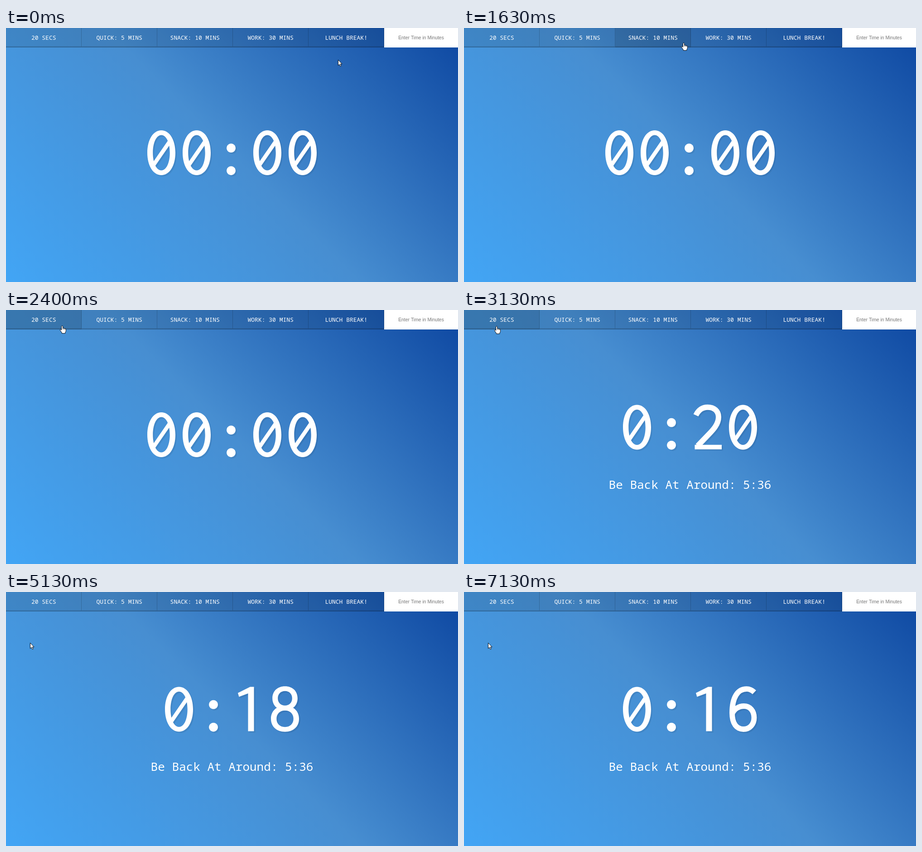
Recreate the animation shown at these times as an HTML page with a canvas. Size 998 by 561 pixels, loop 8000 ms.

```html
<!DOCTYPE html>
<html lang="en">
<head>
<meta charset="utf-8">
<title>Countdown Timer</title>
<style>
  html, body { margin: 0; width: 100%; height: 100%; overflow: hidden; background: #478ed1; }
  canvas { display: block; }
</style>
</head>
<body>
<canvas id="stage" width="998" height="561" role="img"></canvas>
<script>
const W = 998, H = 561, LOOP = 8000;
const BTN = 167, BAR = 43;
const MONO = '"Noto Sans Mono", "DejaVu Sans Mono", monospace';
const LABELS = ['20 SECS', 'QUICK: 5 MINS', 'SNACK: 10 MINS', 'WORK: 30 MINS', 'LUNCH BREAK!'];

const stage = document.getElementById('stage');
const ctx = stage.getContext('2d');
const layer = document.createElement('canvas');
layer.width = W;
layer.height = H;
const ink = layer.getContext('2d');

// Pointer stops: time, x, y, eased arrival
const STOPS = [
  [0, 733, 70], [500, 733, 70], [830, 733, 31, 1], [1130, 733, 30],
  [1630, 485, 33], [1930, 345, 33], [1970, 330, 33], [2030, 318, 33],
  [2500, 72, 36], [3240, 72, 36], [3830, 53, 112, 1], [LOOP, 53, 112]
];

// Countdown readings: start time, text
const READINGS = [[0, '00:00'], [3130, '0:20'], [4100, '0:19'], [5130, '0:18'], [6100, '0:17'], [7130, '0:16']];

// Linear gradient at 45 degrees, corner to corner
const half = (W + H) / 4;
const sky = ctx.createLinearGradient(W / 2 - half, H / 2 + half, W / 2 + half, H / 2 - half);
sky.addColorStop(0, '#42a5f5');
sky.addColorStop(0.5, '#478ed1');
sky.addColorStop(1, '#0d47a1');

// Rounded oval; k sets how square the shoulders are
function oval(x, y, rx, ry, k = 0.58) {
  const a = rx * k, b = ry * k, p = new Path2D();
  p.moveTo(x, y - ry);
  p.bezierCurveTo(x + a, y - ry, x + rx, y - b, x + rx, y);
  p.bezierCurveTo(x + rx, y + b, x + a, y + ry, x, y + ry);
  p.bezierCurveTo(x - a, y + ry, x - rx, y + b, x - rx, y);
  p.bezierCurveTo(x - rx, y - b, x - a, y - ry, x, y - ry);
  p.closePath();
  return p;
}

function ring(x, y, rx, ry, side, cap, k) {
  const p = oval(x, y, rx, ry, k);
  p.addPath(oval(x, y, rx - side, ry - cap, k));
  ink.fill(p, 'evenodd');
}

function stroke(d, width) {
  ink.lineWidth = width;
  ink.stroke(new Path2D(d));
}

const fill = d => ink.fill(new Path2D(d));

// Large numerals, drawn around the middle of their cell
const GLYPHS = {
  0() {
    ring(0, 0, 31, 49.5, 12.3, 10.5);
    stroke('M-18 28L18.5 -25', 8.5);
  },
  1() {
    fill('M1 -49.5H9.5V48.5H-3.5V-35L-23.5 -27.5L-26 -36Z');
  },
  2() {
    stroke('M-26 -26.5C-20 -39 -11 -44.3 0 -44.3C14 -44.3 24 -36 24 -22.5C24 -7 12 6 2 16L-22 41', 12);
    fill('M-28.5 38.8H31V48.8H-28.5Z');
  },
  6() {
    stroke('M25 -37.5C19 -43 14 -44.8 8 -44.8C-12 -44.8 -24 -26 -24 8' +
      'C-24 32 -14 44 1 44C15 44 24.5 33 24.5 18.5C24.5 3 15 -7 2 -7C-9 -7 -19 -1 -23.5 9', 11.8);
  },
  7() {
    fill('M-29 -49H30V-40L-3 48.5H-16.5L16 -38.5H-29Z');
  },
  8() {
    ring(0, -24.3, 27.8, 26.5, 12, 10.5, 0.6);
    ring(0, 21, 31, 28.7, 12.3, 10.5, 0.6);
  },
  9() {
    ink.rotate(Math.PI);
    GLYPHS[6]();
  },
  ':'() {
    ink.fill(oval(-2, -10.3, 9.9, 9.9, 0.552));
    ink.fill(oval(-2, 39.6, 9.9, 9.9, 0.552));
  }
};

function drawReading(text, y) {
  const step = 78;
  ink.clearRect(0, 0, W, H);
  ink.fillStyle = ink.strokeStyle = '#fff';
  [...text].forEach((c, i) => {
    ink.save();
    ink.translate(499 + (i - (text.length - 1) / 2) * step, y);
    GLYPHS[c]();
    ink.restore();
  });
  ctx.save();
  ctx.shadowColor = 'rgba(0,0,0,0.07)';
  ctx.shadowOffsetX = ctx.shadowOffsetY = 3;
  ctx.drawImage(layer, 0, 0);
  ctx.restore();
}

function write(text, x, y, font, color) {
  ctx.font = font;
  ctx.fillStyle = color;
  ctx.textAlign = 'center';
  ctx.fillText(text, x, y);
}

function shade(alpha, x, y, w, h) {
  ctx.fillStyle = `rgba(0,0,0,${alpha})`;
  ctx.fillRect(x, y, w, h);
}

function drawBar(active) {
  LABELS.forEach((label, i) => {
    const x = i * BTN;
    shade(i === active ? 0.2 : 0.1, x, 0, BTN, BAR);
    shade(0.2, x, 40.7, BTN, BAR - 40.7);
    shade(0.18, x + BTN - 1, 0, 1, 40.7);
    write(label, x + 83.2, 26, '500 13px ' + MONO, '#fff');
  });
  ctx.fillStyle = '#fff';
  ctx.fillRect(5 * BTN, 0, W - 5 * BTN, BAR);
  write('Enter Time in Minutes', 916.5, 25, '10.4px "Liberation Sans", Arial, sans-serif', '#757575');
}

const ARROW = new Path2D('M.4 .4V12.8L3.2 10.2L5.2 14.6L7.2 13.7L5.2 9.4H9Z');
const HAND = new Path2D('M-1.5 1.3Q-1.5 0 0 0T1.5 1.3V5.2Q2.8 4.3 3.8 5.6Q5.2 4.9 6.1 6.2' +
  'Q8.3 5.8 8.3 8V11.3Q8.2 13 6.8 14.6V16.6H-.8V14.8L-4.3 10Q-5 8.3 -3.9 7.7Q-3 7.3 -1.5 9.2Z');
const KNUCKLES = new Path2D('M1.5 5V8M3.9 5.8V8.2M6.1 6.4V8.4');

function drawPointer(x, y, hand) {
  const shape = hand ? HAND : ARROW;
  ctx.save();
  ctx.translate(x, y);
  ctx.lineJoin = 'round';
  ctx.lineWidth = 1;
  ctx.strokeStyle = '#0a0f18';
  ctx.fillStyle = '#fff';
  ctx.fill(shape);
  ctx.stroke(shape);
  if (hand) {
    ctx.lineWidth = 0.7;
    ctx.stroke(KNUCKLES);
  }
  ctx.restore();
}

function pointerAt(t) {
  const i = STOPS.findIndex(s => s[0] > t);
  const [t0, x0, y0] = STOPS[i - 1];
  const [t1, x1, y1, eased] = STOPS[i];
  let p = (t - t0) / (t1 - t0);
  if (eased) p = p * p * (3 - 2 * p);
  return [Math.round(x0 + (x1 - x0) * p), Math.round(y0 + (y1 - y0) * p)];
}

function draw(t) {
  const [x, y] = pointerAt(t);
  const over = y < BAR;
  const running = t >= 3130;
  const focused = running && t < 4530;
  const text = READINGS.filter(r => r[0] <= t).pop()[1];

  ctx.fillStyle = sky;
  ctx.fillRect(0, 0, W, H);
  drawBar(focused ? 0 : over ? Math.floor(x / BTN) : -1);
  drawReading(text, running ? 259 : 275.5);
  if (running) write('Be Back At Around: 5:36', 499, 394.5, '26px ' + MONO, '#fff');
  drawPointer(x, y, over);
  if (stage.ariaLabel !== text) stage.ariaLabel = text;
}

const start = performance.now();
function tick() {
  draw((performance.now() - start) % LOOP);
  requestAnimationFrame(tick);
}
tick();
</script>
</body>
</html>
```
